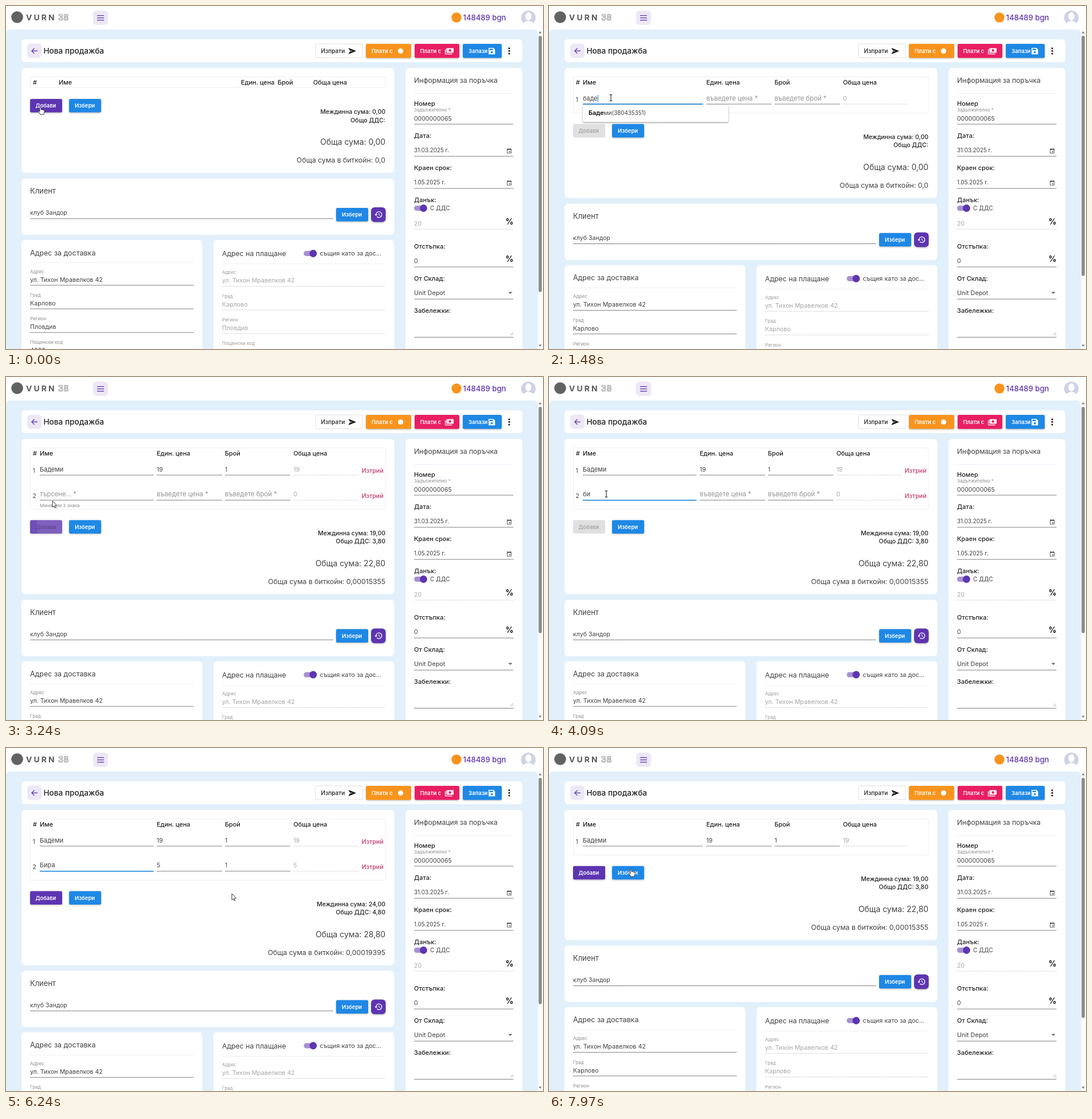
An HTML page with a canvas that plays this animation: 937 by 598 pixels, repeating every 8000 ms.

```html
<!DOCTYPE html>
<html lang="bg">
<head>
<meta charset="utf-8">
<title>Нова продажба</title>
<style>
html, body { margin: 0; width: 100%; height: 100%; overflow: hidden; background: #fff; }
canvas { display: block; width: 937px; height: 598px; }
</style>
</head>
<body>
<canvas id="stage" lang="bg"></canvas>
<script>
const W = 937, H = 598, LOOP = 8000;
const canvas = document.getElementById('stage');
const dpr = window.devicePixelRatio || 1;
canvas.width = W * dpr;
canvas.height = H * dpr;
const ctx = canvas.getContext('2d');

const PURPLE = '#5e35b1', BLUE = '#1e88e5', PINK = '#e91e63', ORANGE = '#f8941d';
const LILAC = '#ede7f6', SKY = '#e1f0fb', INK = '#212121', BODY = '#424242', MUTED = '#a6a6a6';
const STREET = 'ул. Тихон Мравелков 42', CLIENT = 'клуб Зандор', STORE = 'Unit Depot';
const ROW = 43.75;

// Moments of the interaction, in ms
const ADD1 = 200, PICK1 = 1900, ADD2 = 3180, PICK2 = 5030, REMOVE = 6880;
const TYPED = [
  { word: 'баде', start: 920, step: 130, open: 1430, pick: PICK1, name: 'Бадеми', code: '(380435351)', price: '19' },
  { word: 'бира', start: 3850, step: 130, open: 4400, pick: PICK2, name: 'Бира', code: '(380435355)', price: '5' }
];
const FOCUS = [[[380, 1830], [1920, ADD2]], [[3560, 4920], [5200, REMOVE]]];
const ENABLED = [[0, 1], [ADD1, 0], [PICK1, 1], [ADD2, 0], [5130, 1]];
const FADE = 250;

// time, tip x, tip y, pointer shape from that time on
const PATH = [
  [0, 60, 176, 'hand'], [230, 60, 176, 'arrow'], [370, 108, 160, 'beam'],
  [1480, 108, 160, 'beam'], [1600, 124, 178, 'hand'], [1740, 127, 188, 'hand'],
  [1900, 127, 188, 'arrow'], [2560, 127, 188, 'arrow'], [2820, 88, 214, 'hand'],
  [3000, 81, 216, 'hand'], [ADD2, 81, 216, 'arrow'], [3340, 81, 216, 'arrow'],
  [3520, 100, 204, 'beam'], [4480, 100, 204, 'beam'], [4620, 116, 222, 'hand'],
  [4800, 130, 233, 'hand'], [PICK2, 130, 233, 'arrow'], [5920, 138, 238, 'arrow'],
  [6220, 394, 254, 'arrow'], [6310, 394, 254, 'arrow'], [6650, 638, 204, 'hand'],
  [REMOVE, 638, 204, 'arrow'], [7030, 638, 204, 'arrow'], [7560, 136, 212, 'hand'],
  [7720, 138, 213, 'hand'], [7930, 143, 211, 'hand'], [LOOP, 143, 211, 'hand']
];

const clamp = v => Math.max(0, Math.min(1, v));
const easeOut = v => 1 - Math.pow(1 - clamp(v), 3);
const smooth = v => clamp(v) ** 2 * (3 - 2 * clamp(v));

function text(s, x, y, size, { color = BODY, weight = 400, align = 'left', gap = 0 } = {}) {
  ctx.font = `${weight} ${size}px Inter, "Open Sans", sans-serif`;
  ctx.letterSpacing = gap + 'px';
  ctx.textAlign = align;
  ctx.fillStyle = color;
  ctx.fillText(s, x, y);
  return ctx.measureText(s).width;
}

function box(x, y, w, h, r, fill, shadow) {
  ctx.save();
  if (shadow) {
    ctx.shadowColor = `rgba(0,0,0,${shadow})`;
    ctx.shadowBlur = 3 * dpr;
    ctx.shadowOffsetY = 1.3 * dpr;
  }
  ctx.beginPath();
  ctx.roundRect(x, y, w, h, r);
  ctx.fillStyle = fill;
  ctx.fill();
  ctx.restore();
}

function disc(x, y, r, fill) {
  ctx.beginPath();
  ctx.arc(x, y, r, 0, 7);
  ctx.fillStyle = fill;
  ctx.fill();
}

function poly(points, { fill, stroke, width = 1, close = false }) {
  ctx.beginPath();
  points.forEach(([x, y], i) => i ? ctx.lineTo(x, y) : ctx.moveTo(x, y));
  if (close || fill) ctx.closePath();
  if (fill) { ctx.fillStyle = fill; ctx.fill(); }
  if (stroke) { ctx.strokeStyle = stroke; ctx.lineWidth = width; ctx.stroke(); }
}

function rule(x1, x2, y, color = '#808080', dotted = false) {
  ctx.save();
  if (dotted) ctx.setLineDash([1, 1.5]);
  poly([[x1, y], [x2, y]], { stroke: color });
  ctx.restore();
}

const dottedRule = (x1, x2, y) => rule(x1, x2, y, '#b0b0b0', true);

function button(label, x, y, w, h, fill, tx) {
  box(x, y, w, h, 2.5, fill, 0.25);
  text(label, tx, y + h / 2 + 3.4, 9.5, { color: '#fff', weight: 600 });
}

function toggle(x, y) {
  box(x, y - 4.5, 22, 9, 4.5, '#a790d3');
  disc(x + 16.5, y, 6.4, PURPLE);
}

function calendar(x, y) {
  ctx.strokeStyle = '#555';
  ctx.lineWidth = 0.9;
  ctx.strokeRect(x - 3.5, y - 3.2, 7, 7.2);
  box(x - 3.5, y - 3.2, 7, 1.6, 0, '#555');
  box(x - 2.6, y - 4.6, 0.9, 1.4, 0, '#555');
  box(x + 1.7, y - 4.6, 0.9, 1.4, 0, '#555');
  box(x + 0.2, y + 0.6, 1.8, 1.8, 0, '#555');
}

function topBar() {
  disc(19.5, 19.5, 10.3, '#626262');
  text('VURN', 35, 25, 13.8, { color: '#575757', weight: 700, gap: 3.2 });
  ctx.font = '600 13.8px Inter, sans-serif';
  ctx.letterSpacing = '0.8px';
  ctx.strokeStyle = '#777';
  ctx.lineWidth = 0.7;
  ctx.strokeText('38', 91, 25);

  box(152, 8, 26, 25, 6, LILAC);
  for (const y of [16.7, 20.7, 24.7]) poly([[159, y], [171, y]], { stroke: PURPLE, width: 1.3 });

  disc(786, 20, 8.7, ORANGE);
  text('148489 bgn', 797.5, 25, 13.1, { color: PURPLE, weight: 500 });

  ctx.save();
  ctx.beginPath();
  ctx.arc(911.5, 20.5, 12.6, 0, 7);
  ctx.clip();
  box(898, 7, 28, 28, 0, '#cdd2e6');
  ctx.beginPath();
  ctx.ellipse(911.5, 18, 5.3, 7, 0, 0, 7);
  ctx.ellipse(911.5, 33, 9.5, 7, 0, 0, 7);
  ctx.fillStyle = '#fff';
  ctx.fill();
  ctx.restore();
}

function titleBar() {
  box(27, 58, 874, 40, 6, '#fff');
  box(37, 65.5, 25, 25, 6, LILAC);
  poly([[55, 78.3], [45, 78.3]], { stroke: PURPLE, width: 1.3 });
  poly([[49.5, 73.7], [44.9, 78.3], [49.5, 82.9]], { stroke: PURPLE, width: 1.3 });
  text('Нова продажба', 65.5, 82.5, 13.6, { color: INK, weight: 500 });

  box(539.5, 65.5, 83, 25, 3, '#e0e0e0');
  box(540.5, 66.5, 81, 23, 2, '#fff');
  text('Изпрати', 549.5, 81.5, 10.1, { color: INK, weight: 500 });
  poly([[597.5, 73], [611, 78.5], [597.5, 84], [600, 79.2], [606, 78.5], [600, 77.8]], { fill: '#111' });

  button('Плати с', 628, 66, 79, 24.5, ORANGE, 638);
  disc(688.5, 78.5, 4.6, '#fff');
  button('Плати с', 713, 66, 78, 24.5, PINK, 722.5);
  box(768.5, 73.5, 12.5, 8, 1, '#fff');
  disc(774.7, 77.5, 2.3, PINK);
  poly([[766.6, 75.5], [766.6, 83.6], [778.5, 83.6]], { stroke: '#fff', width: 1.3 });
  button('Запази', 797, 66, 68, 24.5, BLUE, 807);
  poly([[842, 73], [850.5, 73], [853.3, 75.8], [853.3, 84.3], [842, 84.3]], { fill: '#fff' });
  box(843.5, 74.5, 6.2, 2.5, 0, BLUE);
  disc(847.7, 80.6, 1.9, BLUE);
  for (const y of [73.7, 78.3, 82.9]) disc(878, y, 1.5, '#111');
}

function sidePanel() {
  const label = (s, y) => text(s, 712, y, 11, { color: INK, weight: 500 });
  const value = (s, y, size = 10.5, color = BODY) => text(s, 712, y, size, { color });
  const line = y => rule(712, 885.5, y);
  const percent = y => text('%', 871.5, y, 14, { color: '#111', weight: 600 });

  box(697, 108, 204, 500, 6, '#fff');
  text('Информация за поръчка', 712, 134.2, 12.1);
  rule(712, 885, 152.5, '#e8f0f6');
  label('Номер', 174);
  text('Задължително *', 712, 184.2, 8, { color: '#8c8c8c' });
  value('0000000065', 199.5);
  line(206);
  label('Дата:', 230);
  value('31.03.2025 г.', 255.3, 9.9);
  calendar(878, 252.5);
  line(262);
  label('Краен срок:', 285.8);
  value('1.05.2025 г.', 311.2, 9.9);
  calendar(878, 308.3);
  line(318);
  label('Данък:', 341.8);
  toggle(712, 352.5);
  text('С ДДС', 740, 356.2, 10.2);
  value('20', 382.6, 10.5, MUTED);
  dottedRule(712, 885.5, 389);
  percent(381);
  label('Отстъпка:', 422.8);
  value('0', 448);
  line(455);
  percent(446.2);
  label('От Склад:', 478.6);
  value(STORE, 503.8, 10.8);
  poly([[876.5, 498.5], [883.5, 498.5], [880, 502]], { fill: '#666' });
  line(511);
  label('Забележки:', 534.5);
  poly([[880, 574], [885, 569]], { stroke: '#999', width: 0.8 });
  poly([[883, 574], [885, 572]], { stroke: '#999', width: 0.8 });
  line(577.5);
}

function addressPanels(dy) {
  const fields = [['Адрес', STREET], ['Град', 'Карлово'], ['Регион', 'Пловдив'], ['Пощенски код', '4300']];
  const column = (x, y, color, labelColor, drawLine) => fields.forEach(([name, value], i) => {
    const top = y + i * 41.2;
    text(name, x, top, 8.1, { color: labelColor });
    text(value, x, top + 15, 10.7, { color });
    drawLine(x, x + 285.5, top + 21.2);
  });

  box(27, 408 + dy, 315.5, 300, 6, '#fff');
  text('Адрес за доставка', 42, 434.7 + dy, 12.5);
  rule(42, 327, Math.round(447 + dy) + 0.5, '#edf1f4');
  column(42, 465.6 + dy, BODY, '#8c8c8c', rule);

  box(362, 408 + dy, 315.5, 300, 6, '#fff');
  text('Адрес на плащане', 377, 436.2 + dy, 12.3);
  toggle(519.5, 431.5 + dy);
  text('същия като за дос...', 547.5, 435.3 + dy, 10.9);
  rule(377, 662, Math.round(449 + dy) + 0.5, '#edf1f4');
  column(377, 467.4 + dy, MUTED, '#9a9a9a', dottedRule);
}

function clientPanel(dy) {
  box(27, 301 + dy, 650.5, 98, 6, '#fff');
  text('Клиент', 42, 327 + dy, 12.9);
  text(CLIENT, 42, 364.3 + dy, 10.6);
  rule(42, 571, 370.8 + dy);
  button('Избери', 576, 352 + dy, 56, 23.5, BLUE, 586);

  const cx = 650, cy = 363.7 + dy;
  box(637, 351 + dy, 25.5, 25.5, 6, PURPLE, 0.3);
  ctx.beginPath();
  ctx.arc(cx + 0.7, cy, 5, -Math.PI, Math.PI * 0.75);
  ctx.strokeStyle = '#fff';
  ctx.lineWidth = 1.3;
  ctx.stroke();
  poly([[cx - 6.8, cy - 0.4], [cx - 1.8, cy - 0.4], [cx - 4.3, cy + 2.3]], { fill: '#fff' });
  poly([[cx + 0.7, cy - 2.8], [cx + 0.7, cy + 0.5], [cx + 3, cy + 1.8]], { stroke: '#fff' });
}

function addButton(t, y) {
  const [since, on] = ENABLED.filter(e => e[0] <= t).pop();
  const k = since ? smooth((t - since) / FADE) : 1;
  const level = on ? k : 1 - k;
  const from = [224, 224, 224], to = [94, 53, 177];
  const fill = `rgb(${from.map((c, i) => Math.round(c + (to[i] - c) * level))})`;
  box(42, y, 56, 23.5, 2.5, fill, 0.25 * level);

  const age = t - ADD2;
  if (age >= 0 && age < 350) {
    ctx.save();
    ctx.beginPath();
    ctx.roundRect(42, y, 56, 23.5, 2.5);
    ctx.clip();
    disc(81, y + 10, 12 + age * 0.26, `rgba(255,255,255,${0.12 * (1 - age / 350)})`);
    ctx.restore();
  }
  text('Добави', 51.5, y + 15.2, 9.4, { color: on ? '#fff' : 'rgba(0,0,0,0.26)', weight: 600 });
}

function itemRow(i, t, cols, two) {
  const item = TYPED[i], y = i * ROW;
  const picked = t >= item.pick;
  const typed = item.word.slice(0, Math.max(0, Math.floor((t - item.start) / item.step) + 1));
  const name = picked ? item.name : typed;
  const focus = FOCUS[i].find(([a, b]) => t >= a && t < b);
  const [nameX, priceX, qtyX, sumX] = cols;
  const nameEnd = two ? 257.5 : 268.5;
  const base = 164.5 + y, lineY = 171 + y;

  text(String(i + 1), 46.5, 167 + y, 10.3);
  const width = name ? text(name, nameX, base, 11) : 0;
  if (!name) {
    text('търсене... *', nameX, base, 11.2, { color: focus ? '#64aaea' : '#929292' });
    text('Минимум 3 знака', nameX, 183.3 + y, 8, { color: '#8c8c8c' });
  }
  rule(nameX, nameEnd, lineY);
  if (focus) {
    const age = t - focus[0];
    const half = (nameEnd - nameX) / 2, mid = nameX + half, reach = half * easeOut(age / 300);
    box(mid - reach, lineY - 0.8, reach * 2, 1.6, 0, BLUE);
    if (age % 1060 < 530) box(nameX + width + 0.3, 155 + y, 1, 12, 0, BLUE);
  }

  const cell = (value, hint, x) => picked
    ? text(value, x, base, 10.5)
    : text(hint, x, base, 11.3, { color: '#929292' });
  cell(item.price, 'въведете цена *', priceX);
  cell('1', 'въведете брой *', qtyX);
  rule(priceX, priceX + 114, lineY);
  rule(qtyX, qtyX + 114, lineY);
  text(picked ? item.price : '0', sumX, base, 10.5, { color: MUTED });
  dottedRule(sumX, sumX + 114, lineY);
  if (two) text('Изтрий', 620.5, 167.2 + y, 10.7, { color: '#c2386f', weight: 500 });
}

function suggestion(i, t) {
  const item = TYPED[i], y = i * ROW;
  if (t < item.open || t >= item.pick) return;
  const hover = t > item.open + 200;
  box(59, 172.2 + y, 254, 30, 2, hover ? '#f3f3f3' : '#fff', 0.4);
  const head = item.name.slice(0, item.word.length);
  let x = 69;
  x += text(head, x, 190 + y, 10.8, { color: INK, weight: 700 });
  x += text(item.name.slice(head.length), x, 190 + y, 10.3);
  text(item.code, x, 190 + y, 9.8);
}

function itemsPanel(t, rows, dy) {
  const two = rows === 2;
  const cols = rows === 0 ? [92, 410, 474, 536] : two ? [59, 263, 382, 501.5] : [59, 274.5, 393.5, 513];
  box(27, 108, 650.5, 183 + dy, 6, '#fff');
  ctx.strokeStyle = '#efefef';
  ctx.lineWidth = 1;
  ctx.strokeRect(42.5, 123.5, 619.5, Math.round(19 + dy));
  text('#', 47, 136.6, 10.6, { color: INK, weight: 500 });
  ['Име', 'Един. цена', 'Брой', 'Обща цена'].forEach((s, i) =>
    text(s, cols[i], 136.6, 10.9, { color: INK, weight: 500 }));
  for (let i = 0; i < rows; i++) itemRow(i, t, cols, two);

  addButton(t, 162 + dy);
  button('Избери', 110, 162 + dy, 56, 23.5, BLUE, 120);

  const [net, vat, total, coin] = two && t >= PICK2 ? ['24,00', ' 4,80', '28,80', '0,00019395']
    : t >= PICK1 ? ['19,00', ' 3,80', '22,80', '0,00015355'] : ['0,00', '', '0,00', '0,0'];
  const sum = (s, y, size, weight = 400) =>
    text(s, 662, y + dy, size, { color: weight > 400 ? INK : BODY, weight, align: 'right' });
  sum('Междинна сума: ' + net, 188, 10.5, 500);
  sum('Общо ДДС:' + vat, 202.6, 10.5, 500);
  sum('Обща сума: ' + total, 242, 13.9);
  sum('Обща сума в биткойн: ' + coin, 273, 12.25);
}

function scrollbar(rows) {
  box(928, 41, 9, 557, 0, '#fbfbfb');
  poly([[929.5, 47.5], [934.5, 47.5], [932, 44]], { fill: '#777' });
  poly([[929.5, 590.5], [934.5, 590.5], [932, 594]], { fill: '#777' });
  box(929.3, 52, 5.6, [446.5, 418.5, 394.5][rows], 2.8, '#8b8b8b');
}

function pointer(t) {
  let i = PATH.length - 2;
  while (i > 0 && PATH[i][0] > t) i--;
  const [t0, x0, y0, kind] = PATH[i], [t1, x1, y1] = PATH[i + 1];
  const k = smooth((t - t0) / (t1 - t0));
  ctx.save();
  ctx.translate(x0 + (x1 - x0) * k, y0 + (y1 - y0) * k);
  ctx.lineJoin = 'round';
  if (kind === 'beam') {
    for (const [color, w] of [['#fff', 2.2], ['#111', 1]]) {
      poly([[0, -5], [0, 5]], { stroke: color, width: w });
      poly([[-2.3, -5.3], [2.3, -5.3]], { stroke: color, width: w });
      poly([[-2.3, 5.3], [2.3, 5.3]], { stroke: color, width: w });
    }
  } else if (kind === 'arrow') {
    poly([[0, 0], [0, 11], [2.5, 8.8], [4.1, 12.3], [5.8, 11.5], [4.3, 8.1], [7.5, 7.8]],
      { fill: '#fff', stroke: '#222', width: 0.9 });
  } else {
    ctx.beginPath();
    ctx.moveTo(-1.1, 8);
    ctx.lineTo(-1.1, 1);
    ctx.quadraticCurveTo(0, -1, 1.1, 1);
    ctx.lineTo(1.1, 4.6);
    for (const x of [1.1, 3.1, 5]) ctx.quadraticCurveTo(x + 1.1, 3.6 + x * 0.2, x + 2, 5.2 + x * 0.1);
    ctx.lineTo(7, 9);
    ctx.quadraticCurveTo(6.5, 11, 5.6, 13.3);
    ctx.lineTo(0, 13.3);
    ctx.quadraticCurveTo(-2.2, 10.3, -3.6, 7.6);
    ctx.quadraticCurveTo(-2.8, 6, -1.1, 8);
    ctx.closePath();
    ctx.fillStyle = '#fff';
    ctx.fill();
    ctx.strokeStyle = '#222';
    ctx.lineWidth = 0.9;
    ctx.stroke();
  }
  ctx.restore();
}

function draw(now) {
  const t = now % LOOP;
  const rows = t < ADD1 ? 0 : t >= ADD2 && t < REMOVE ? 2 : 1;
  const dy = rows * ROW;
  ctx.setTransform(dpr, 0, 0, dpr, 0, 0);
  ctx.fillStyle = '#fff';
  ctx.fillRect(0, 0, W, H);
  topBar();
  box(0, 41, 928, 570, [7, 7, 0, 0], SKY);
  titleBar();
  sidePanel();
  itemsPanel(t, rows, dy);
  clientPanel(dy);
  addressPanels(dy);
  for (let i = 0; i < rows; i++) suggestion(i, t);
  scrollbar(rows);
  pointer(t);
}

const start = performance.now();
function tick() {
  draw(performance.now() - start);
  requestAnimationFrame(tick);
}
tick();
</script>
</body>
</html>
```
